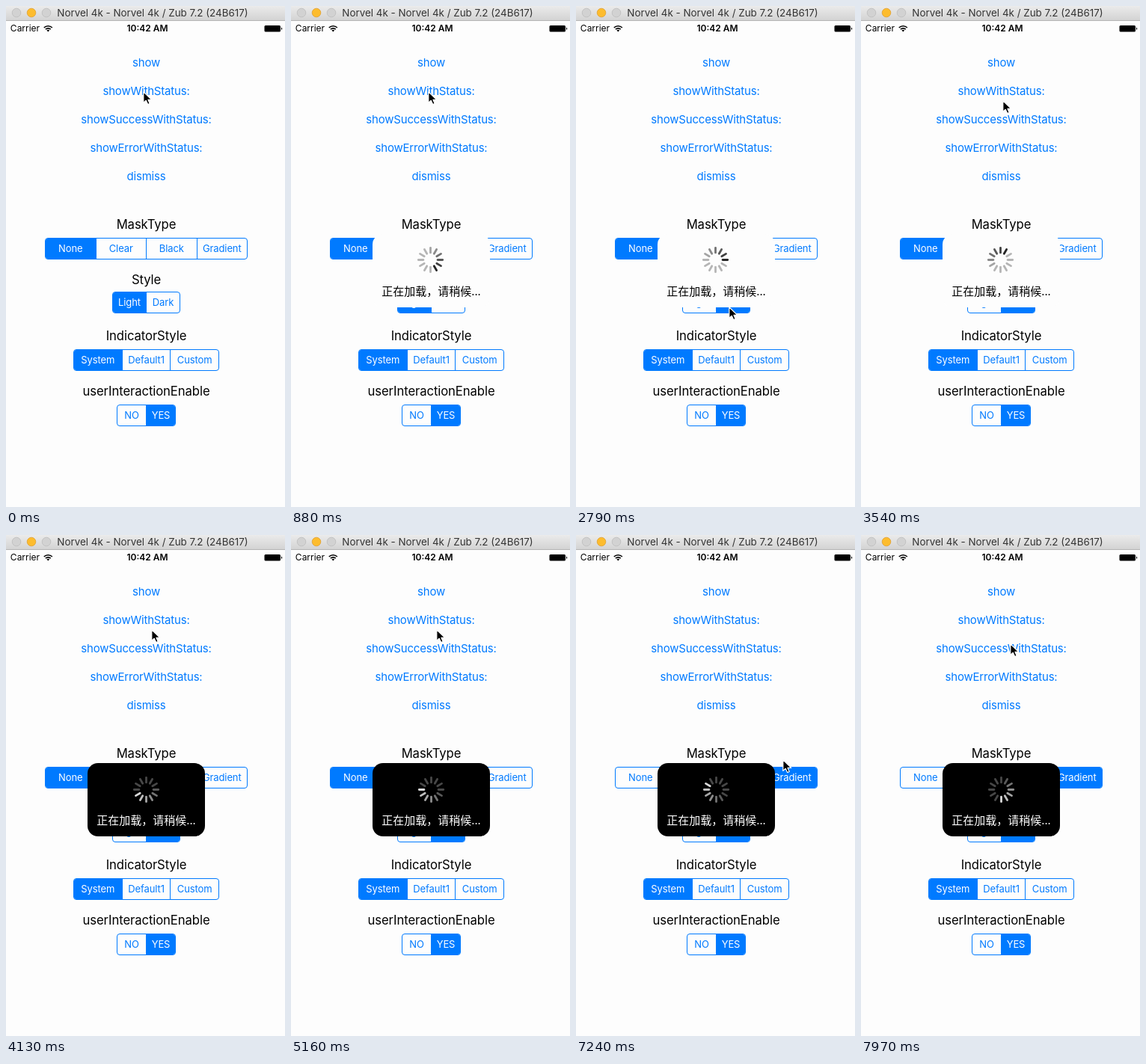
These frames come from a looping animation (373x670 px, 8000 ms). An HTML page:

```html
<!DOCTYPE html>
<html lang="en">
<head>
<meta charset="utf-8">
<style>
  html, body { margin: 0; width: 100%; height: 100%; overflow: hidden; }
  body { position: relative; background: #fdfdfd; color: #000; font-family: Inter, Roboto, sans-serif; }
  #titlebar { position: absolute; inset: 0 0 auto; height: 19px; border-bottom: 1px solid #b4b4b4; background: linear-gradient(#ebebeb, #d3d3d3); }
  .text { position: absolute; line-height: 20px; white-space: nowrap; transform: translateX(-50%); }
  .link { font-size: 15px; color: #007aff; letter-spacing: -.2px; }
  .label { font-size: 16.7px; letter-spacing: -.1px; }
  .segments { position: absolute; display: flex; box-sizing: border-box; height: 29px; border: 1px solid #007aff; border-radius: 4px; overflow: hidden; }
  .segments span { flex: 1; line-height: 27px; text-align: center; font-size: 13px; letter-spacing: -.1px; color: #007aff; white-space: nowrap; }
  .segments span + span { border-left: 1px solid #007aff; }
  .segments .on { background: #007aff; color: #fff; }
  #hud { position: absolute; left: 109px; top: 305px; width: 157px; height: 98px; border-radius: 14px; background: #fdfdfd; color: #000; }
  #hud.dark { background: #000; color: #fff; }
  #hud p { position: absolute; left: 0; right: 0; top: 66px; margin: 0; text-align: center; font: 15px/20px "Noto Sans CJK SC", "Noto Sans CJK", sans-serif; white-space: nowrap; }
  svg { position: absolute; left: 0; top: 0; overflow: visible; }
</style>
</head>
<body>
<div id="titlebar"></div>
<svg width="373" height="40">
  <g stroke-width=".8">
    <circle cx="14" cy="9" r="5.8" fill="#d2d2d2" stroke="#bdbdbd"/>
    <circle cx="34" cy="9" r="5.8" fill="#fdbc2e" stroke="#e0a030"/>
    <circle cx="54" cy="9" r="5.8" fill="#d2d2d2" stroke="#bdbdbd"/>
  </g>
  <g fill="none" stroke="#000" stroke-width="1.7">
    <path d="M50.8 29a7.8 7.8 0 0 1 11 0M52.9 31.2a4.8 4.8 0 0 1 6.8 0"/>
    <path d="M54.4 32.6a2.7 2.7 0 0 1 3.8 0L56.3 34.6z" fill="#000" stroke="none"/>
  </g>
  <rect x="345.5" y="26" width="21.5" height="8.5" rx="1.5"/>
  <path d="M368 28.5a2 2 0 0 1 0 3.6z"/>
</svg>
<div id="hud">
  <svg id="spinner" width="1" height="1" stroke="currentColor" stroke-width="2.8" stroke-linecap="round"></svg>
  <p lang="zh-CN">正在加载&#xFF0C;请稍候...</p>
</div>
<svg id="cursor" width="14" height="20">
  <path d="M.8 .8V15.4L4.2 12.3L6.6 17.6L9.2 16.5L7 11.4H11.7Z" fill="#000" stroke="#fff" stroke-width="1.2" stroke-linejoin="round"/>
</svg>
<script>
const LOOP = 8000, FIRST = 140, STEP = 147.74;
const hud = document.getElementById('hud');
const spinner = document.getElementById('spinner');
const cursor = document.getElementById('cursor');

function addText(text, x, y, className, style = '') {
  const el = document.createElement('div');
  el.className = 'text ' + className;
  el.textContent = text;
  el.style.cssText = `left:${x}px;top:${y - 10}px;${style}`;
  document.body.insertBefore(el, hud);
  return el;
}

function addSegments(names, x, y, width) {
  const el = document.createElement('div');
  el.className = 'segments';
  el.style.cssText = `left:${x}px;top:${y}px;width:${width}px`;
  el.innerHTML = names.map(name => `<span>${name}</span>`).join('');
  document.body.insertBefore(el, hud);
  return index => [...el.children].forEach((cell, i) => cell.classList.toggle('on', i === index));
}

addText('Norvel 4k - Norvel 4k / Zub 7.2 (24B617)', 196, 9, '', 'font-size:13.4px;color:#333');
addText('Carrier', 25.5, 30, '', 'font-size:12px');
addText('10:42 AM', 189, 30, '', 'font-size:12px;font-weight:600');

const links = ['show', 'showWithStatus:', 'showSuccessWithStatus:', 'showErrorWithStatus:', 'dismiss']
  .map((name, i) => addText(name, 187.5, 75.5 + 38 * i, 'link'));
['MaskType', 'Style', 'IndicatorStyle', 'userInteractionEnable']
  .forEach((name, i) => addText(name, 187.5, 292 + 74.4 * i, 'label'));

const selectMask = addSegments(['None', 'Clear', 'Black', 'Gradient'], 52, 310, 271);
const selectStyle = addSegments(['Light', 'Dark'], 142, 382, 91);
addSegments(['System', 'Default1', 'Custom'], 90, 459, 195)(0);
addSegments(['NO', 'YES'], 148, 533, 79)(1);

spinner.innerHTML = Array.from({ length: 12 }, (_, i) =>
  `<path d="M0-9.6V-16.2" transform="rotate(${i * 30})"/>`).join('');

// Pointer path: time, x, y of the tip.
const path = [
  [1200, 184, 115], [1470, 222, 185], [1620, 231, 260], [1770, 216, 350], [1920, 205, 404],
  [2650, 205, 404], [2800, 216, 330], [2950, 218, 230], [3100, 200, 150], [3250, 190, 127],
  [3600, 190, 127], [3840, 195, 127], [5310, 195, 127], [5450, 225, 110], [5600, 262, 115],
  [5750, 290, 150], [5900, 281, 199], [6050, 279, 250], [6200, 277, 290], [6350, 277, 301],
  [7390, 277, 301], [7540, 262, 265], [7690, 230, 200], [7830, 206, 153], [7960, 200, 146]
];

function pointerAt(t) {
  const i = path.findIndex(p => p[0] > t);
  if (i < 0) return path.at(-1).slice(1);
  if (i === 0) return path[0].slice(1);
  const [t0, x0, y0] = path[i - 1], [t1, x1, y1] = path[i];
  const k = (t - t0) / (t1 - t0);
  return [x0 + (x1 - x0) * k, y0 + (y1 - y0) * k];
}

const between = (t, from, to) => t >= from && t < to;

function draw(now) {
  // The screen refreshes at a slow, fixed cadence.
  const elapsed = now % LOOP;
  const t = elapsed < FIRST ? 0 : FIRST + Math.floor((elapsed - FIRST + 4) / STEP) * STEP;

  links[1].style.opacity = between(t, 130, 280) || between(t, 3680, 3830) ? .25 : 1;
  selectStyle(t < 2490 ? 0 : 1);
  selectMask(t < 7230 ? 0 : 3);

  const dark = t >= 3825, appearing = between(t, 280, 420);
  hud.className = dark ? 'dark' : '';
  hud.style.opacity = t < 280 ? 0 : appearing ? .8 : 1;
  hud.style.transform = appearing ? 'scale(1.025)' : '';

  spinner.style.transform = dark ? 'translate(78.5px,35.5px)' : 'translate(77.5px,34.5px)';
  const lead = Math.floor(5.85 + 12 * (t - 880) / 1000);
  [...spinner.children].forEach((spoke, i) => {
    const age = ((lead - i) % 12 + 12) % 12;
    spoke.style.opacity = Math.max(.28, .85 - age * .1);
  });

  const [x, y] = pointerAt(t);
  cursor.style.transform = `translate(${Math.round(x) - 1}px,${Math.round(y) - 1}px)`;
}

function tick() {
  draw(performance.now());
  requestAnimationFrame(tick);
}
tick();
</script>
</body>
</html>
```
